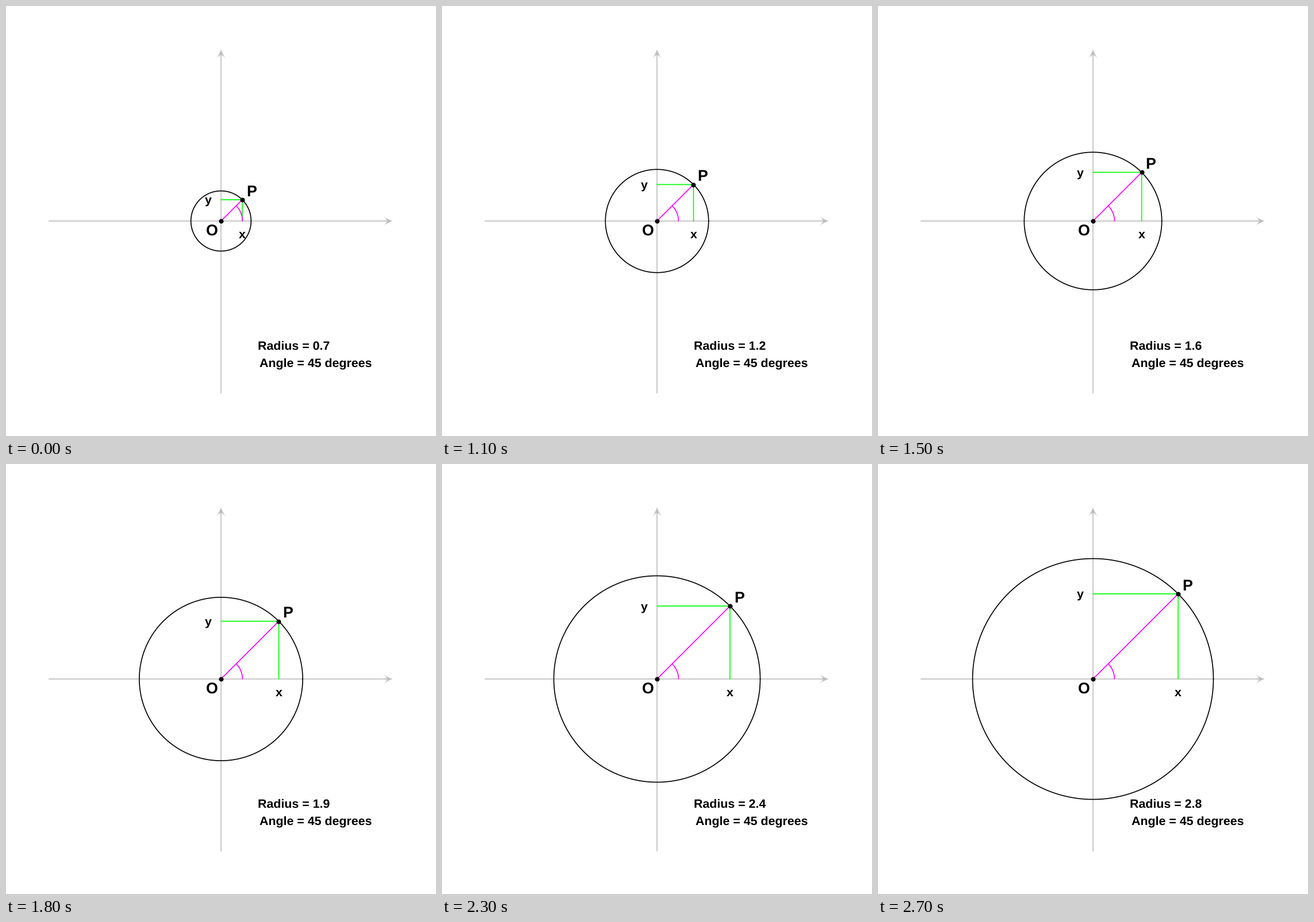
A matplotlib script for the animation above (3000 ms loop, 748 by 748 pixels).

```python
import numpy as np
import matplotlib.pyplot as plt
from matplotlib.animation import FuncAnimation

SIZE, DPI = 748, 100
UNIT = SIZE / 10              # the stage spans -5 to 5 on both axes
PX = 72 / DPI                 # points per pixel
GRAY, GREEN, MAGENTA = "#bebebe", "#00ff00", "#ff00ff"
SMALL, LARGE = 21.37, 26.7    # font sizes in pixels
ANGLE = np.pi / 4

plt.rcParams.update({
    "font.family": "Liberation Sans",
    "font.weight": "bold",
    "text.hinting": "none",
    "path.snap": False,
})

fig = plt.figure(figsize=(SIZE / DPI, SIZE / DPI), dpi=DPI, facecolor="white")
ax = fig.add_axes([0, 0, 1, 1])
ax.set_xlim(-5, 5)
ax.set_ylim(-5, 5)
ax.axis("off")


def line(x, y, color, z, width=1.67):
    return ax.plot(x, y, color=color, lw=width * PX, zorder=z,
                   solid_capstyle="round")[0]


def dot(z=6):
    return ax.plot([0], [0], "o", color="black", ms=8 * PX, mew=0, zorder=z)[0]


def label(x, y, text, size):
    """Centred text whose baseline sits a third of its size below y."""
    return ax.text(x, y - size / 3 / UNIT, text, fontsize=size * PX,
                   ha="center", va="baseline", zorder=7)


def move_label(item, x, y, size):
    item.set_position((x, y - size / 3 / UNIT))


def arrow_head():
    """Barbed head pointing along +x with its tip at (4, 0)."""
    t = np.linspace(0, 1, 20)
    side = np.column_stack([-16.5 * t, 8 * t ** 1.35])
    back = np.column_stack([-16.5 + 6 * np.sin(np.pi * t), 8 - 16 * t])
    shape = np.vstack([side, back, side[::-1] * [1, -1]])
    return shape / UNIT + [4, 0]


def arc(radius, end):
    t = np.linspace(0, end, 200)
    return radius * np.cos(t), radius * np.sin(t)


# Axes
head = arrow_head()
line([-4, 3.9], [0, 0], GRAY, 1)
line([0, 0], [-4, 3.9], GRAY, 1)
ax.fill(head[:, 0], head[:, 1], color=GRAY, lw=0, zorder=1)
ax.fill(head[:, 1], head[:, 0], color=GRAY, lw=0, zorder=1)

# Moving parts
circle = line([], [], "black", 2)
drops = line([], [], GREEN, 3)
spoke = line([], [], MAGENTA, 4)
point = dot()
p_label = label(0, 0, "P", LARGE)
x_label = label(0, -0.3, "x", SMALL)
y_label = label(-0.3, 0, "y", SMALL)
radius_label = label(1.7, -2.9, "", SMALL)

# Fixed parts
line(*arc(0.5, ANGLE), MAGENTA, 5)
dot()
label(-0.21, -0.23, "O", LARGE)
label(2.2, -3.3, "Angle = 45 degrees", SMALL)


def draw(frame):
    tenths = 7 + min(max(frame - 6, 0), 21)
    r = tenths / 10
    x, y = r * np.cos(ANGLE), r * np.sin(ANGLE)
    circle.set_data(*arc(r, 2 * np.pi))
    drops.set_data([0, x, x], [y, y, 0])
    spoke.set_data([0, x], [0, y])
    point.set_data([x], [y])
    move_label(p_label, x + 0.21, y + 0.2, LARGE)
    move_label(x_label, x, -0.3, SMALL)
    move_label(y_label, -0.3, y, SMALL)
    radius_label.set_text(f"Radius = {r:g}")
    return circle, drops, spoke, point, p_label, x_label, y_label, radius_label


anim = FuncAnimation(fig, draw, frames=30, interval=100, repeat=True,
                     repeat_delay=0, init_func=lambda: draw(0))
plt.show()
```
